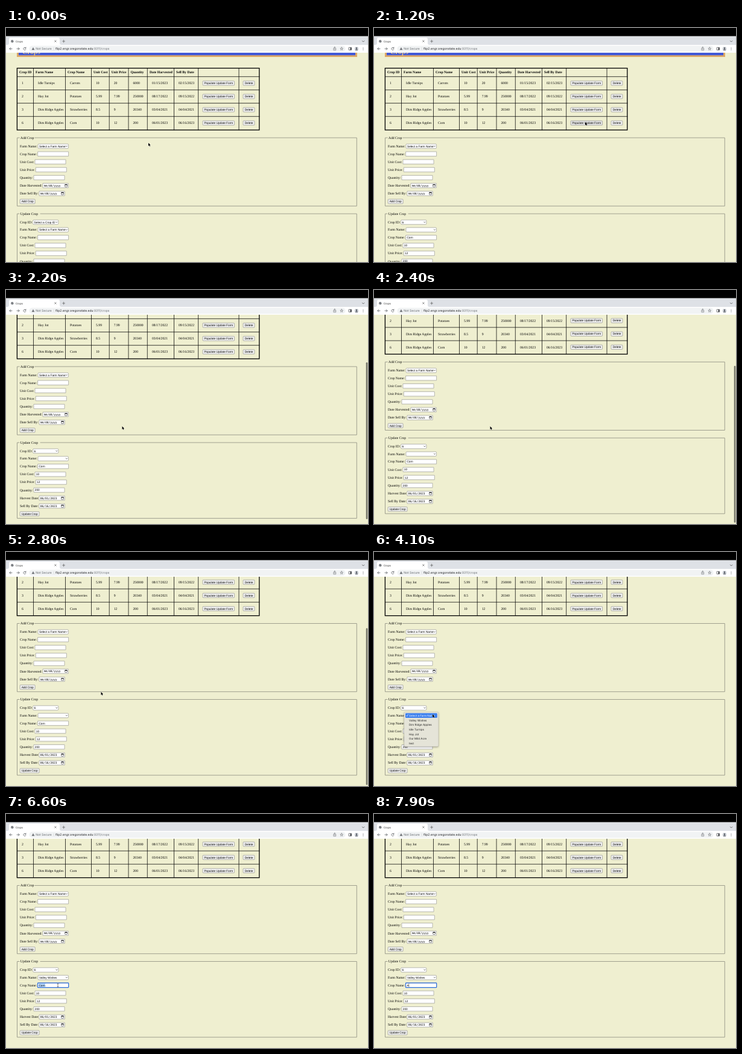
These frames come from a looping animation (600x388 px, 8000 ms). An HTML page:

```html
<!DOCTYPE html>
<html lang="en">
<head>
<meta charset="utf-8">
<title>Crops</title>
<style>
  html, body { margin: 0; width: 100%; height: 100%; overflow: hidden; background: #efefd0; }
  svg { display: block; width: 100%; height: 100%; }
  text { text-rendering: geometricPrecision; white-space: pre; }
  .serif { font: 5.714px "Liberation Serif", "Times New Roman", serif; }
  .bold { font-weight: bold; }
  .sans { font: 4.76px "Liberation Sans", Arial, sans-serif; }
  .mono { font: 4.6px "DejaVu Sans Mono", monospace; }
  .ui { font: 5px Inter, Roboto, sans-serif; }
  .small { font-size: 4.3px; }
  .menu { font-size: 4.5px; }
  .line { fill: none; stroke-linecap: round; stroke-linejoin: round; }
</style>
</head>
<body>
<svg id="stage" viewBox="0 0 600 388" preserveAspectRatio="none"></svg>
<script>
const LOOP = 8000;
const stage = document.getElementById('stage');

function add(parent, tag, attrs, content) {
  const node = document.createElementNS('http://www.w3.org/2000/svg', tag);
  for (const key in attrs) node.setAttribute(key, attrs[key]);
  if (content !== undefined) node.textContent = content;
  parent.appendChild(node);
  return node;
}
const group = parent => add(parent, 'g', {});
const rect = (p, x, y, width, height, fill, more) =>
  add(p, 'rect', { x, y, width, height, fill, ...more });
const text = (p, x, y, str, cls, fill = '#000') =>
  add(p, 'text', { x, y, class: cls, fill }, str);
const line = (p, d, stroke, width) =>
  add(p, 'path', { d, stroke, 'stroke-width': width, class: 'line' });
const show = (node, on) => node.setAttribute('visibility', on ? 'visible' : 'hidden');

// ---- form controls, all placed by vertical centre ----
const H = 7.4;
function box(p, x, cy, w, r, fill) {
  return rect(p, x, cy - H / 2, w, H, fill, { rx: r, stroke: '#767676', 'stroke-width': 0.5 });
}
function button(p, x, cy, w, label) {
  const face = box(p, x, cy, w, 1.1, '#efefef');
  text(p, x + w / 2, cy + 1.65, label, 'sans').setAttribute('text-anchor', 'middle');
  return face;
}
function input(p, x, cy, w = 51) {
  box(p, x, cy, w, 0.2, '#fff');
  return text(p, x + 1.8, cy + 1.65, '', 'sans');
}
function select(p, x, cy, w, value) {
  box(p, x, cy, w, 1.6, '#fff');
  const cx = x + w - 3;
  line(p, `M${cx - 1.2} ${cy - .6}L${cx} ${cy + .7}L${cx + 1.2} ${cy - .6}`, '#222', 0.6);
  return text(p, x + 2, cy + 1.65, value, 'sans');
}
function dateInput(p, x, cy) {
  box(p, x, cy, 42.3, 0.2, '#fff');
  const ix = x + 36.8;
  rect(p, ix, cy - 1.7, 3.6, 3.7, 'none', { stroke: '#111', 'stroke-width': 0.5 });
  rect(p, ix, cy - 1.9, 3.6, 1.2, '#111');
  return text(p, x + 1.8, cy + 1.6, 'mm/dd/yyyy', 'mono');
}
function fieldset(p, top, bottom, legend, gapEnd) {
  line(p, `M22.3 ${top}H18.5V${bottom}H581.3V${top}H${gapEnd}`, '#8b8b7e', 0.8);
  text(p, 23.8, top + 1.8, legend, 'serif');
}
const label = (p, cy, str) => text(p, 23, cy + 1.8, str, 'serif');

// ---- page ----
rect(stage, 0, 0, 600, 388, '#efefd0');
const page = group(stage);

rect(page, 18, 20, 564, 28, '#dca766');
rect(page, 21, 23, 558, 22.2, '#4058d8');
text(page, 27, 42.6, 'Crops', 'serif bold', '#dfc08a').style.fontSize = '11.43px';

const columns = [
  [22, 'Crop ID'], [49, 'Farm Name'], [102, 'Crop Name'], [145, 'Unit Cost'],
  [174.7, 'Unit Price'], [206.5, 'Quantity'], [238, 'Date Harvested'], [282, 'Sell By Date']
];
const rows = [
  '1|Idle Turnips|Carrots|10|20|6000|01/15/2023|02/15/2023',
  '2|Hay Jot|Potatoes|5.99|7.99|250000|08/17/2022|09/15/2022',
  '3|Dim Ridge Apples|Strawberries|8.5|9|20340|03/04/2021|04/04/2021',
  '6|Dim Ridge Apples|Corn|10|12|200|06/01/2023|06/16/2023'
];
for (const x of [45.5, 98.5, 141.5, 171.2, 203, 234.3, 278.5, 318.7, 386])
  line(page, `M${x} 66.5V169`, '#000', 0.75);
for (let i = 0; i < 4; i++) line(page, `M18.5 ${80.7 + 22 * i}H420`, '#000', 0.75);
rect(page, 18.4, 66.6, 401.4, 102.5, 'none', { stroke: '#000', 'stroke-width': 1.3 });
columns.forEach(([x, name]) => text(page, x, 75.3, name, 'serif bold'));

let populate;
rows.forEach((row, i) => {
  const cy = 91.5 + 22 * i;
  row.split('|').forEach((cell, c) => text(page, columns[c][0] + 4, cy + 1.8, cell, 'serif'));
  populate = button(page, 326, cy, 52.6, 'Populate Update Form');
  button(page, 393, cy, 19, 'Delete');
});

fieldset(page, 182, 295.2, 'Add Crop', 47.6);
label(page, 196, 'Farm Name:');
select(page, 53, 196, 50.5, 'Select a Farm Name');
const textFields = [['Crop Name:', 52.6], ['Unit Cost:', 48], ['Unit Price:', 49.3], ['Quantity:', 46]];
textFields.forEach(([name, x], i) => {
  const cy = 208.8 + 13.1 * i;
  label(page, cy, name);
  input(page, x, cy);
});
label(page, 261.2, 'Date Harvested:');
dateInput(page, 61, 261.2);
label(page, 274.4, 'Date Sell By:');
dateInput(page, 55, 274.4);
button(page, 23.2, 287.6, 25, 'Add Crop');

fieldset(page, 308, 433.6, 'Update Crop', 57);
label(page, 322, 'Crop ID:');
const cropId = select(page, 44.6, 322, 42.3, '');
label(page, 334.6, 'Farm Name:');
const farm = select(page, 53, 334.6, 50.5, '');
const values = textFields.map(([name, x], i) => {
  const cy = 347.4 + 13.1 * i;
  label(page, cy, name);
  if (i) return input(page, x, cy);
  const nameField = input(page, x, cy);
  nameField.before(rect(page, 54.2, cy - 2.8, 11, 5.6, '#b3d7ff', { id: 'selection' }));
  return nameField;
});
const dates = [['Harvest Date:', 400], ['Sell By Date:', 413.1]].map(([name, cy]) => {
  label(page, cy, name);
  return dateInput(page, 55, cy);
});
button(page, 23.2, 426.1, 32, 'Update Crop');
const selection = document.getElementById('selection');
const focusRing = rect(page, 52.5, 343.6, 51.2, 7.6, 'none', { rx: 0.8, stroke: '#2f6fe0', 'stroke-width': 1.2 });
const caret = rect(page, 57.7, 344.7, 0.45, 5.4, '#000');

const thumb = rect(stage, 596.7, 79, 2.6, 260, '#77776b', { rx: 1.3 });

// ---- browser frame ----
const frame = group(stage);
rect(frame, 0, 0, 600, 41, '#fff');
rect(frame, 0, 13.5, 600, 14.5, '#dee1e6');
rect(frame, 0, 0, 600, 13.5, '#000');
add(frame, 'path', { d: 'M2 28Q5 28 5 25V18.6Q5 16 7.6 16H86.4Q89 16 89 18.6V25Q89 28 92 28Z', fill: '#fff' });
add(frame, 'circle', { cx: 10.3, cy: 22, r: 2.2, fill: '#5f6368' });
line(frame, 'M8.6 21.4Q10 22.6 10.5 21.2T12 21M9.6 23.6L10.8 22.8', '#fff', 0.5);
text(frame, 15.7, 23.6, 'Crops', 'ui small', '#333');
line(frame, 'M80.6 20.6L83.2 23.2M83.2 20.6L80.6 23.2M93.6 22H97.6M95.6 20V24', '#444', 0.6);
line(frame, 'M590.4 21.2L592.2 23L594 21.2', '#444', 0.7);
rect(frame, 38.5, 29.4, 524, 10, '#f1f3f4', { rx: 5 });
line(frame, 'M10 34.4H6M7.9 32.4L5.9 34.4L7.9 36.4', '#55585c', 0.75);
line(frame, 'M18 34.4H22M20.1 32.4L22.1 34.4L20.1 36.4', '#55585c', 0.75);
line(frame, 'M32.7 33.2A2.1 2.1 0 1 0 33 35.1M33 31.9V33.5H31.4', '#55585c', 0.7);
add(frame, 'path', { d: 'M45 32.1L47.4 36.3H42.6Z', fill: '#5f6368' });
rect(frame, 44.75, 33.4, 0.5, 1.5, '#fff');
text(frame, 49.3, 36.1, 'Not Secure', 'ui', '#5f6368');
rect(frame, 78.9, 31.8, 0.4, 5.2, '#c0c3c7');
const url = text(frame, 82, 36.1, '', 'ui');
add(url, 'tspan', { fill: '#202124' }, 'flip2.engr.oregonstate.edu');
add(url, 'tspan', { fill: '#6b6f74' }, ':9311/crops');
line(frame, 'M543.6 33.6H542.9V36.8H546.7V33.6H546M544.8 35.2V31.4M543.7 32.4L544.8 31.3L545.9 32.4', '#55585c', 0.55);
const star = Array.from({ length: 10 }, (_, i) => {
  const a = i * Math.PI / 5, r = i % 2 ? 1.1 : 2.6;
  return `${556.3 + r * Math.sin(a)},${34.5 - r * Math.cos(a)}`;
}).join(' ');
add(frame, 'polygon', { points: star, class: 'line', stroke: '#55585c', 'stroke-width': 0.5 });
rect(frame, 568, 32.3, 4.6, 4.2, 'none', { rx: 0.4, stroke: '#44474b', 'stroke-width': 0.7 });
rect(frame, 570.5, 32.3, 2.1, 4.2, '#44474b');
add(frame, 'circle', { cx: 581, cy: 34.5, r: 3.4, fill: '#d3d7dc' });
add(frame, 'circle', { cx: 581, cy: 33.5, r: 1.2, fill: '#4a4f58' });
add(frame, 'path', { d: 'M578.7 36.7Q581 33.9 583.3 36.7Z', fill: '#4a4f58' });
for (const cy of [32.7, 34.5, 36.3]) add(frame, 'circle', { cx: 592, cy, r: 0.5, fill: '#44474b' });

// ---- farm menu ----
const menu = group(stage);
menu.style.filter = 'drop-shadow(0 1px 1.6px rgba(0,0,0,.35))';
rect(menu, 50, 265.3, 56.8, 57.2, '#e5e4d8', { rx: 2.2, stroke: '#bdbcb0', 'stroke-width': 0.4 });
const highlight = rect(menu, 52, 0, 52.8, 7.8, '#3c80ee', { rx: 1.4 });
const check = line(menu, 'M53.7 271.2L54.7 272.5L56.4 269.5', '#222', 0.65);
const farms = ['Select a Farm Name', 'Valley Wishes', 'Dim Ridge Apples', 'Idle Turnips', 'Hay Jot', 'Our Mild Acre', 'test'];
const itemY = i => 271.2 + 7.73 * i;
const items = farms.map((name, i) => text(menu, 58, itemY(i) + 1.6, name, 'ui menu'));

// ---- pointers ----
const arrow = add(stage, 'path', {
  d: 'M0 0V5.2L1.2 4.1L2.1 6L2.9 5.6L2.1 3.8H3.7Z',
  fill: '#000', stroke: '#fff', 'stroke-width': 0.5, 'paint-order': 'stroke'
});
const beam = line(stage, 'M-.9 -2.7Q0 -2.7 0 -2V2Q0 2.7 -.9 2.7M.9 -2.7Q0 -2.7 0 -2M0 2Q0 2.7 .9 2.7', '#111', 0.5);

// ---- motion: [time, ...values] ----
const pointerKeys = [
  [0, 236, 190.5], [900, 350, 156], [1200, 350, 156], [1800, 192.5, 226], [2600, 192.5, 226],
  [2800, 157.5, 232], [3500, 97, 269], [4500, 97, 269], [5400, 94.5, 277.3],
  [6000, 94.5, 277.3], [6300, 86, 284]
];
const scrollKeys = [[1900, 0], [2000, 0.4], [2100, 32], [2200, 55], [2300, 60.5], [2400, 62.7], [2500, 63.5]];

const ease = u => u * u * (3 - 2 * u);
function sample(keys, t) {
  if (t <= keys[0][0]) return keys[0].slice(1);
  const i = keys.findIndex(k => k[0] > t);
  if (i < 0) return keys[keys.length - 1].slice(1);
  const a = keys[i - 1], b = keys[i];
  const u = ease((t - a[0]) / (b[0] - a[0]));
  return a.slice(1).map((v, n) => v + (b[n + 1] - v) * u);
}

function render(now) {
  const t = Math.floor((now % LOOP) / 100) * 100;
  const [x, y] = sample(pointerKeys, t);
  const [scroll] = sample(scrollKeys, t);

  page.setAttribute('transform', `translate(0 ${-scroll})`);
  thumb.setAttribute('y', 79 + scroll * 0.746);
  thumb.setAttribute('opacity', t < 1900 ? 0 : Math.max(0, Math.min(1, (3200 - t) / 300)));

  const overButton = t < 2000 && x > 326 && x < 379 && y > 153 && y < 162;
  populate.setAttribute('fill', !overButton ? '#efefef' : t === 1000 ? '#f5f5f5' : '#e2e2e2');

  const filled = t >= 1100, typed = t >= 7900;
  cropId.textContent = filled ? '6' : 'Select a Crop ID';
  farm.textContent = t >= 6200 ? farms[1] : filled ? '' : farms[0];
  [typed ? 'A' : 'Corn', '10', '12', '200'].forEach((v, i) => values[i].textContent = filled ? v : '');
  ['06/01/2023', '06/16/2023'].forEach((v, i) => dates[i].textContent = filled ? v : 'mm/dd/yyyy');

  show(focusRing, t >= 6400);
  show(selection, t >= 6600 && !typed);
  show(caret, typed);

  show(menu, t >= 3800 && t < 6200);
  const active = y > 275 ? 1 : 0;
  highlight.setAttribute('y', itemY(active) - 3.9);
  highlight.setAttribute('opacity', t === 6000 ? 0 : 1);
  items.forEach((item, i) => item.setAttribute('fill', i === active && t !== 6000 ? '#fff' : '#222'));
  check.setAttribute('stroke', active ? '#222' : '#fff');

  const place = `translate(${x} ${y})`;
  arrow.setAttribute('transform', place);
  beam.setAttribute('transform', place);
  show(arrow, t < 6200);
  show(beam, t >= 6200 && !typed);
}

const start = performance.now();
function tick() {
  render(performance.now() - start);
  requestAnimationFrame(tick);
}
tick();
</script>
</body>
</html>
```
